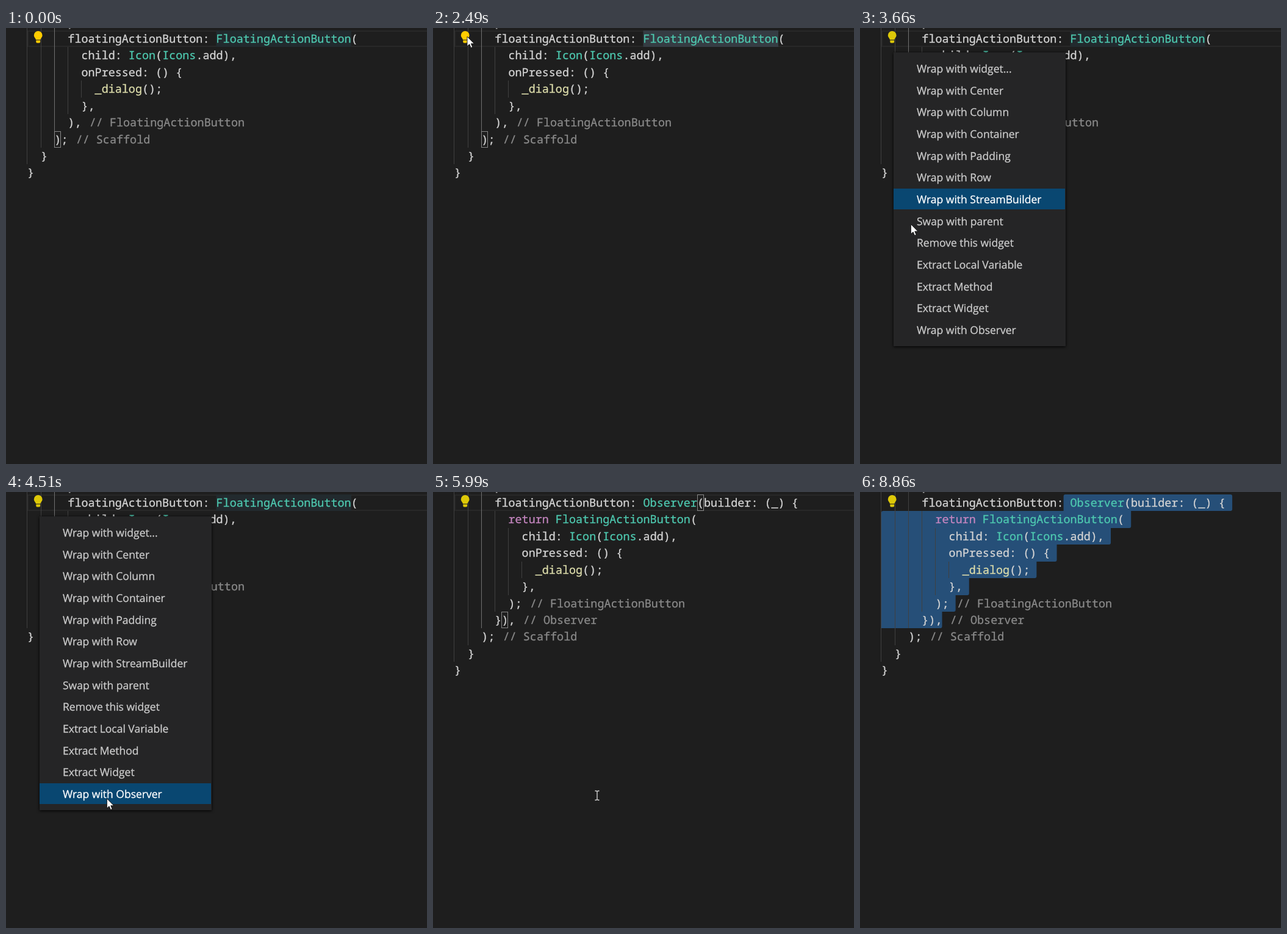
Animation of 690 by 714 pixels, one loop 9.03 s. Source, as an HTML page:

```html
<!DOCTYPE html>
<html lang="en">
<head>
<meta charset="utf-8">
<title>Wrap with Observer</title>
<style>
  html, body { margin: 0; width: 100%; height: 100%; overflow: hidden; background: #1e1e1e; }
  svg { display: block; width: 690px; height: 714px; }
  text { white-space: pre; text-rendering: geometricPrecision; font-kerning: none; color: #d4d4d4; }
  text, tspan { fill: currentColor; stroke: currentColor; stroke-width: .3px; }
  .code text { font: 18.433px "Noto Sans Mono", "DejaVu Sans Mono", monospace; }
  .code .type { color: #4ec9b0; }
  .code .func { color: #dcdcaa; }
  .code .word { color: #c586c0; }
  .code .note { color: #8a8a8a; }
  .guide { fill: #404040; }
  .active { fill: #707070; }
  .bracket { fill: none; stroke: #888; }
  .menu text { font: 17.5px "Open Sans", "Noto Sans", sans-serif; color: #ccc; }
  .menu text.on { color: #fff; }
  .panel { fill: #252526; filter: drop-shadow(0 1px 2.5px #000); }
</style>
</head>
<body>
<svg viewBox="0 0 690 714">
  <rect id="lineMark" x="36" y="5" width="660" height="25" fill="none" stroke="#282828" stroke-width="2"/>
  <rect id="wordMark" x="344.5" y="4" width="221.5" height="27"/>
  <path id="selection" fill="#264f78"/>
  <g id="before" class="code"></g>
  <g id="after" class="code"></g>
  <rect x="103" y="0" width="2.5" height="1.5" fill="#999"/>
  <path id="bulb" d="M49 19.2C49 17 45.8 15.6 45.8 12a6.9 6.9 0 0 1 13.8 0C59.6 15.6 56.4 17 56.4 19.2ZM49.3 20.3H56.1V23.2L55 24.5H50.4L49.3 23.2Z"/>
  <rect id="caret" width="1.6" height="27" fill="#d0d0cc"/>
  <g id="menu" class="menu">
    <rect class="panel" x="55" y="40" width="282" height="481"/>
    <rect id="choice" x="55" width="281" height="34" fill="#094771"/>
  </g>
  <circle id="press" r="12" fill="#ff0" fill-opacity=".48"/>
  <path id="beam" d="M-3.5-7.5H-1.5L0-6.5 1.5-7.5H3.5M0-6.5V6.5M-3.5 7.5H-1.5L0 6.5 1.5 7.5H3.5" fill="none" stroke="#ddd" stroke-width="1.3"/>
  <path id="arrow" d="M0 0V16L3.7 12.6 6.2 18.4 8.8 17.3 6.4 11.7H11.5Z" fill="#fff" stroke="#111" stroke-width=".9"/>
</svg>
<script>
const LOOP = 9030, STEP = 77, BLINK = 500;
const X0 = 35, CW = 11.06, ROW = 27.43, ITEM = 35.68;
const CLICK_BULB = 2640, CLICK_ITEM = 5450, CLICK_MS = 75, WRAP = 5600, DRAG = 6830, DROP = 7440;

const $ = id => document.getElementById(id);
const colX = col => X0 + col * CW;
const rowY = row => Math.round(4 + row * ROW);
const itemY = i => Math.round(49 + i * ITEM);
const clamp = (v, max) => Math.max(0, Math.min(max, v));
const code = line => line.split("//")[0];
const indent = line => line.search(/\S/);

const before = `      floatingActionButton: FloatingActionButton(
        child: Icon(Icons.add),
        onPressed: () {
          _dialog();
        },
      ),// FloatingActionButton
    );// Scaffold
  }
}`.split("\n");

const after = `      floatingActionButton: Observer(builder: (_) {
        return FloatingActionButton(
          child: Icon(Icons.add),
          onPressed: () {
            _dialog();
          },
        );// FloatingActionButton
      }),// Observer
    );// Scaffold
  }
}`.split("\n");

const wraps = ["widget...", "Center", "Column", "Container", "Padding", "Row", "StreamBuilder"];
const items = [...wraps.map(s => "Wrap with " + s), "Swap with parent", "Remove this widget",
  "Extract Local Variable", "Extract Method", "Extract Widget", "Wrap with Observer"];

// Pointer key points; it travels in even steps between start and end
const home = { x: 647, y: 572 };
const moves = [
  { start: 240, end: 1080, x: 438, y: 20 },
  { start: 1630, end: 2490, x: 56, y: 14 },
  { start: 3120, end: 3965, x: 99, y: 497 },
  { start: 4120, end: 4980, x: 245, y: 508 },
  { start: 5130, end: 5280, x: 254, y: 499 },
  { start: CLICK_ITEM, end: 5985, x: 269, y: 497 },
  { start: 5985, end: 6290, x: 345, y: 103 },
  { start: 6370, end: 6680, x: 337, y: 18 },
  { start: DRAG, end: 7135, x: 334, y: 124 },
  { start: 7135, end: DROP, x: 150, y: 212 },
  { start: 7690, end: 8400, x: 595, y: 724 },
];

function pointer(t) {
  let { x, y } = home;
  for (const m of moves) {
    if (t < m.start) break;
    const steps = Math.round((m.end - m.start) / STEP);
    const k = Math.min(1, Math.floor((t - m.start) / (m.end - m.start) * steps + .15) / steps);
    x += (m.x - x) * k;
    y += (m.y - y) * k;
  }
  return [x, y];
}

function add(parent, name, attrs, html = "") {
  const el = document.createElementNS("http://www.w3.org/2000/svg", name);
  for (const key in attrs) el.setAttribute(key, attrs[key]);
  el.innerHTML = html;
  return parent.appendChild(el);
}

const paint = s => s
  .replace(/\b(FloatingActionButton|Observer|Icons?)\b/g, '<tspan class="type">$1</tspan>')
  .replace("_dialog", '<tspan class="func">_dialog</tspan>')
  .replace("return", '<tspan class="word">return</tspan>');

function buildCode(group, lines, brackets) {
  ["      ,", ...lines].forEach((line, i) => {
    const y = rowY(i - 1);
    for (let c = 0; c < indent(line); c += 2)
      add(group, "rect", { class: c === 4 ? "guide scope" : "guide",
        x: Math.round(34.4 + c * CW), y, width: 1, height: rowY(i) - y });
  });
  lines.forEach((line, i) => {
    const [body, note] = line.split("//"), y = 24 + i * ROW;
    add(group, "text", { x: colX(indent(line)), y }, paint(body.trim()));
    if (note) add(group, "text", { class: "note", x: colX(body.length) + 13.3, y }, "//" + note);
  });
  for (const [row, col] of brackets)
    add(group, "rect", { class: "bracket", x: Math.round(colX(col)) + .5, y: rowY(row) + .5, width: 10, height: 26 });
}

buildCode($("before"), before, [[6, 4]]);
buildCode($("after"), after, [[0, 36], [7, 7]]);
const scopes = document.querySelectorAll(".scope");
const pairs = document.querySelectorAll(".bracket");
const labels = items.map((s, i) => add($("menu"), "text", { x: 93, y: itemY(i) + 23.5 }, s));

function selectionEnd(t) {
  const [x, y] = pointer(Math.min(t, DROP));
  const row = clamp(Math.floor((y - 4) / ROW), after.length - 1);
  return [row, Math.min(Math.round((x - X0) / CW), code(after[row]).length)];
}

// Rows merge into one shape; only protruding corners are rounded
function selectionPath([last, col]) {
  const ends = after.slice(0, last + 1)
    .map((line, i) => colX(i < last ? code(line).length + 1 : col));
  return ends.map((right, i) => {
    const left = i ? X0 : colX(27), top = rowY(i), bottom = rowY(i + 1);
    if (right - left < CW / 2) return "";
    const tl = i < 2 ? 3 : 0;
    const tr = right > (ends[i - 1] || 0) ? 3 : 0;
    const br = right > (ends[i + 1] || 0) ? 3 : 0;
    return `M${left} ${bottom}V${top + tl}q0 ${-tl} ${tl} ${-tl}H${right - tr}q${tr} 0 ${tr} ${tr}` +
      `V${bottom - br}q0 ${br} ${-br} ${br}Z`;
  }).join("");
}

const show = (el, on) => { el.style.display = on ? "" : "none"; };
const place = (el, x, y) => el.setAttribute("transform", `translate(${x} ${y})`);
const within = (t, start, length) => t >= start && t < start + length;
const blink = (t, phase) => t >= phase && (t - phase) % (2 * BLINK) < BLINK;

function render(t) {
  const [x, y] = pointer(t);
  const wrapped = t >= WRAP, selecting = t >= DRAG, dragging = selecting && t < DROP;
  const menuAt = CLICK_BULB + CLICK_MS;
  const open = t >= menuAt && t < CLICK_ITEM + CLICK_MS;

  show($("before"), !wrapped);
  show($("after"), wrapped);
  show($("lineMark"), !selecting);
  show($("wordMark"), !wrapped);
  $("wordMark").setAttribute("fill", t > 1000 && t < menuAt ? "#353c43" : "#222a2e");
  $("bulb").setAttribute("fill", t < CLICK_BULB ? "#ffcc00" : "#ddc808");
  scopes.forEach(el => el.classList.toggle("active", !selecting));
  pairs.forEach(el => show(el, !selecting));

  const end = selecting ? selectionEnd(t) : [0, 36];
  $("selection").setAttribute("d", selecting ? selectionPath(end) : "");
  place($("caret"), Math.round(colX(end[1])) + .2, rowY(end[0]));
  show($("caret"), dragging || (wrapped ? blink(t, 360) : t < menuAt && blink(t, 980)));

  // The highlighted item trails the pointer by one step
  const pick = clamp(Math.floor((pointer(t - STEP)[1] - 49) / ITEM), items.length - 1);
  show($("menu"), open);
  $("choice").setAttribute("y", itemY(pick));
  labels.forEach((el, i) => el.classList.toggle("on", i === pick));

  const arrow = t >= 2410 && t < WRAP;
  show($("arrow"), arrow);
  show($("beam"), !arrow && t >= moves[0].start);
  show($("press"), dragging || within(t, CLICK_BULB, CLICK_MS) || within(t, CLICK_ITEM, CLICK_MS));
  place($("arrow"), x, y);
  place($("beam"), x, y);
  place($("press"), x - (arrow ? 0 : 2), y - (arrow ? 0 : 1));
}

const start = performance.now();
function tick() {
  render((performance.now() - start) % LOOP);
  requestAnimationFrame(tick);
}
tick();
</script>
</body>
</html>
```
